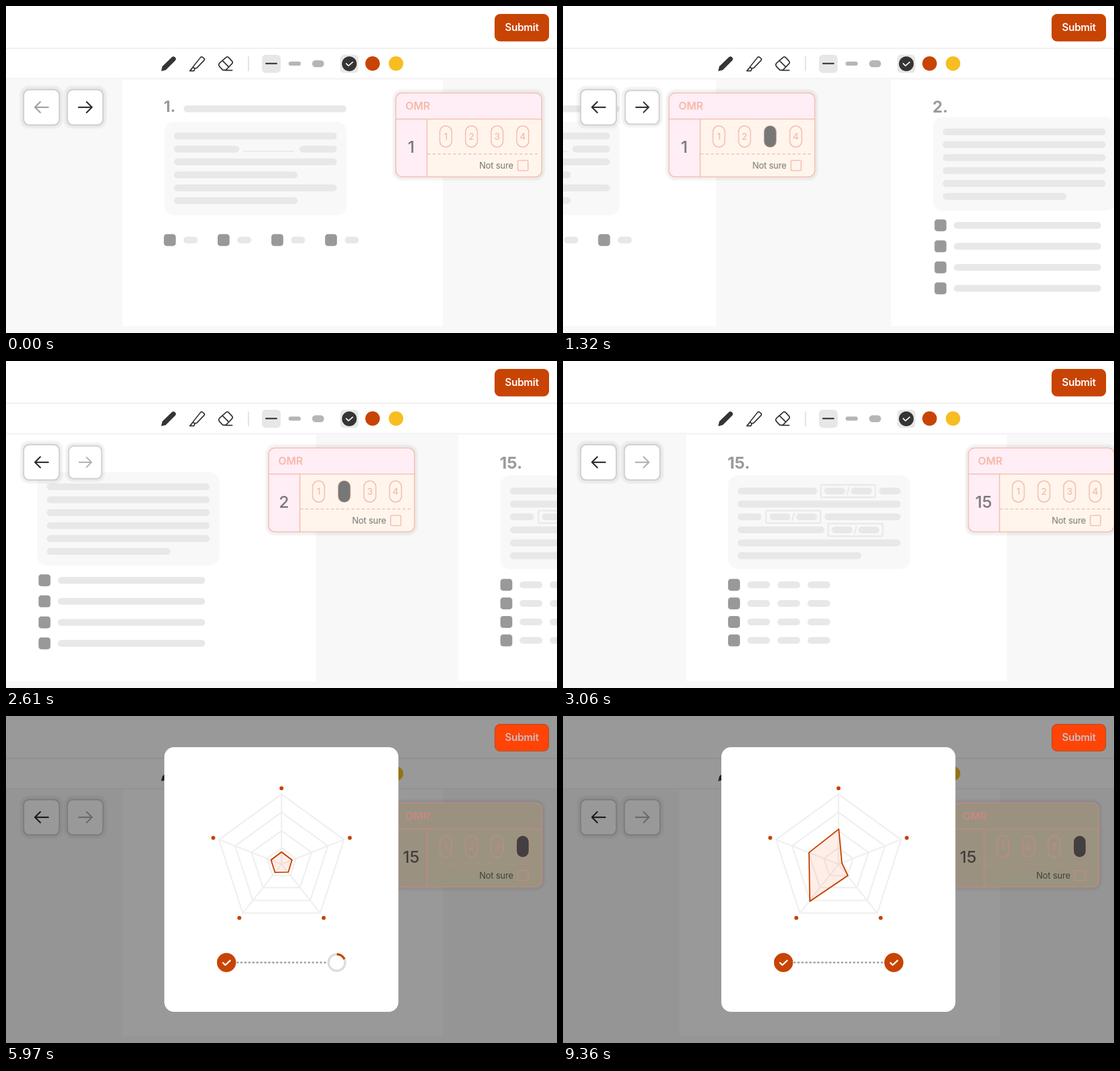
Write an HTML page that moves like this. It is 971 by 577 pixels and loops after 9390 ms.

```html
<!DOCTYPE html>
<html lang="en">
<head>
<meta charset="utf-8">
<title>Answer sheet</title>
<style>
html, body { margin: 0; width: 100%; height: 100%; overflow: hidden; background: #fff; }
svg { display: block; width: 971px; height: 577px; font-family: Inter, "Open Sans", sans-serif; }

.bar { fill: #e8e8e8; }
.box { fill: #f8f8f8; }
.key { fill: #999; }
.slot { fill: none; stroke: #e8e8e8; stroke-width: 2.5; }
.num { font-size: 28px; font-weight: 700; fill: #999; }
.halo { fill: #000; opacity: .055; filter: blur(1.5px); }
.icon { fill: none; stroke: #373435; stroke-width: 2; stroke-linejoin: round; stroke-linecap: round; }
.check { fill: none; stroke: #fff; stroke-width: 2.6; stroke-linecap: round; stroke-linejoin: round; }

.pink { fill: #ffeef5; }
.cream { fill: #fff5ec; }
.line { fill: none; stroke: #f5b9a9; stroke-width: 1.6; }
.tint { fill: #f5b9a9; font-weight: 600; }
.ink { fill: #777; }

.web { fill: none; stroke: #efefef; stroke-width: 2.5; }
.arc { fill: none; stroke: #c84404; stroke-width: 4; stroke-dasharray: 100 200; }

/* one shared loop */
.a { animation: 9.39s cubic-bezier(.65, 0, .35, 1) infinite; }
.step { animation-timing-function: step-end; }

#p1, #o1 { animation-name: out1; }
#p2 { --from: 770px; animation-name: pass2; }
#o2 { --from: 1770px; animation-name: pass2; }
#p3 { --from: 770px; animation-name: in3; }
#o3 { --from: 1770px; animation-name: in3; }
@keyframes out1 { 0%, 9.052% { transform: none; } 18.978%, 100% { transform: translateX(-971px); } }
@keyframes pass2 {
  0%, 9.052% { transform: translateX(var(--from)); }
  18.978%, 23.951% { transform: translateX(0); }
  33.876%, 100% { transform: translateX(-971px); }
}
@keyframes in3 { 0%, 23.951% { transform: translateX(var(--from)); } 33.876%, 100% { transform: translateX(0); } }

#m1 { animation-name: mark1; }
#m2 { animation-name: mark2; }
#m3 { animation-name: mark3; }
@keyframes mark1 { 0% { opacity: 0; } 3.195%, 100% { opacity: 1; } }
@keyframes mark2 { 0% { opacity: 0; } 20.234%, 100% { opacity: 1; } }
@keyframes mark3 { 0% { opacity: 0; } 36.209%, 100% { opacity: 1; } }

#next { transform-origin: 139.5px 178.5px; animation-name: press; }
@keyframes press {
  0%, 5.431%, 18.978%, 20.9%, 33.876%, 100% { transform: scale(1); }
  8.6%, 9.052%, 23.6%, 23.951% { transform: scale(.9); }
}
#backArrow { animation-name: wake; }
#nextArrow { animation-name: rest; }
@keyframes wake { 0%, 5.431% { stroke: #a0a0a0; } 9.052%, 100% { stroke: #2e2b2b; } }
@keyframes rest { 0%, 20.9% { stroke: #2e2b2b; } 23.951%, 100% { stroke: #b0b0b0; } }

#submit { transform-origin: 909px 38px; animation-name: send; }
#submit rect { animation-name: glow; }
#submit text { animation-name: glowText; }
@keyframes send { 0%, 41.534%, 46.326%, 100% { transform: scale(1); } 44.196% { transform: scale(.95); } }
@keyframes glow {
  0%, 48.562% { fill: #c84404; stroke: #c84404; }
  51.438%, 100% { fill: #ff4405; stroke: #a34a2c; }
}
@keyframes glowText { 0%, 46.326% { fill: #fff; } 48.562% { fill: #ebe2e0; } 51.438%, 100% { fill: #c9bfc4; } }

#dim { animation-name: dim; }
@keyframes dim { 0%, 46.326% { opacity: 0; } 51.438%, 100% { opacity: .4; } }

#o3 .pink { animation-name: dimPink; }
#o3 .cream { animation-name: dimCream; }
#o3 .line { animation-name: dimLine; }
#o3 .tint { animation-name: dimTint; }
#o3 .ink { animation-name: dimInk; }
@keyframes dimPink { 0%, 46.326% { fill: #ffeef5; } 48.562% { fill: #d2d2d2; } 51.438%, 100% { fill: #9a9180; } }
@keyframes dimCream { 0%, 46.326% { fill: #fff5ec; } 48.562% { fill: #dedede; } 51.438%, 100% { fill: #9a9380; } }
@keyframes dimLine { 0%, 46.326% { stroke: #f5b9a9; } 48.562% { stroke: #e09a86; } 51.438%, 100% { stroke: #c48a80; } }
@keyframes dimTint { 0%, 46.326% { fill: #f5b9a9; } 48.562% { fill: #dc9f90; } 51.438%, 100% { fill: #c48a80; } }
@keyframes dimInk { 0%, 46.326% { fill: #777; } 48.562% { fill: #3a3637; } 51.438%, 100% { fill: #433f40; } }

#modal { transform-origin: 485.5px 288.5px; animation-name: open; }
@keyframes open { 0%, 46.326% { opacity: 0; transform: scale(.7); } 51.438%, 100% { opacity: 1; transform: scale(1); } }

#arc1 { animation-name: load1; }
#arc2 { animation-name: load2; }
#done1 { animation-name: done1; }
#done2 { animation-name: done2; }
@keyframes load1 { 0%, 51.438% { stroke-dashoffset: 96; } 59.106%, 100% { stroke-dashoffset: 0; } }
@keyframes load2 { 0%, 60.788% { stroke-dashoffset: 101; } 68.456%, 100% { stroke-dashoffset: 0; } }
@keyframes done1 { 0%, 59.106% { opacity: 0; } 60.7%, 100% { opacity: 1; } }
@keyframes done2 { 0%, 68.456% { opacity: 0; } 70%, 100% { opacity: 1; } }

#score { fill: #f4622b; fill-opacity: .11; stroke: #c84404; stroke-width: 2.2; stroke-linejoin: round; animation-name: grow; }
@keyframes grow {
  0%, 69% { d: path("M485.5 240L504 254L497.5 275.5L474 276L467 254Z"); }
  76.5%, 100% { d: path("M486 199.5L491.5 259.5L502 281.5L435 327L433.5 241Z"); }
}
</style>
</head>
<body>
<svg id="stage" viewBox="0 0 971 577"></svg>
<script>
const rect = (cls, x, y, x2, y2, r = 0, more = '') =>
  `<rect class="${cls}" x="${x}" y="${y}" width="${x2 - x}" height="${y2 - y}" rx="${r}" ${more}/>`;
const bar = (x, x2, y) => rect('bar', x, y - 6, x2, y + 6, 6);
const key = (x, y) => rect('key', x, y - 10.5, x + 21, y + 10.5, 5);
const text = (cls, x, y, s, more = '') => `<text class="${cls}" x="${x}" y="${y}" ${more}>${s}</text>`;
const each = (list, fn) => list.map(fn).join('');
const circle = (x, y, r, more) => `<circle cx="${x}" cy="${y}" r="${r}" ${more}/>`;
const mid = 'text-anchor="middle"';

const page = (id, body) => `<g id="${id}" class="a">${rect('', 205, 130, 770, 565, 0, 'fill="#fff"')}${body}</g>`;

// a framed pair of short words with a slash
const pair = (x, y) => rect('slot', x, y - 11, x + 96, y + 11, 2) + bar(x + 6, x + 43, y) +
  bar(x + 53, x + 90, y) + `<path class="slot" d="M${x + 46} ${y + 7}l4-14"/>`;

const page1 = page('p1',
  text('num', 278, 187, '1.', 'style="font-size:27px"') + bar(313, 600, 181.5) +
  rect('box', 279, 204.5, 600, 369, 17) +
  each([229.5, 275, 321], y => bar(296, 583, y)) +
  bar(296, 411, 252.5) + bar(517, 583, 252.5) + rect('bar', 418, 255.5, 508, 257.5) +
  each([298, 343.5], y => bar(296, 514, y)) +
  each([0, 1, 2, 3], i => key(278.2 + i * 94.7, 413) + bar(312.7 + i * 94.7, 337.7 + i * 94.7, 413)));

const page2 = page('p2',
  text('num', 278, 188, '2.') + rect('box', 279, 196, 600, 361, 17) +
  each([0, 1, 2, 3, 4, 5], i => bar(296, i < 5 ? 583 : 514, 222 + i * 22.8)) +
  each([0, 1, 2, 3], i => key(281.5, 387 + i * 37.1) + bar(315.5, 575, 387 + i * 37.1)));

const page3 = page('p3',
  text('num', 278, 189.5, '15.', 'style="font-size:29px"') + rect('box', 279, 202, 600, 367, 17) +
  bar(296, 436, 229.5) + pair(442.5, 229.5) + bar(545, 583, 229.5) + bar(296, 583, 252.5) +
  bar(296, 338, 275) + pair(346, 275) + bar(449, 583, 275) +
  bar(296, 449, 298) + pair(455.5, 298) + bar(296, 583, 321) + bar(296, 514, 343.5) +
  each([0, 1, 2, 3], i => {
    const y = 395 + i * 32.7;
    return key(279, y) + each([313, 366, 419], x => bar(x, x + 40, y));
  }));

const sheet = (n, label, pick) => {
  const pill = (i, cls, more) => rect(cls, 764.5 + i * 45.2, 211.5, 785.5 + i * 45.2, 249, 10.5, more);
  return `<g id="o${n}" class="a">` + rect('halo', 681.5, 147.5, 949.5, 307.5, 16) +
    rect('a cream', 687, 153.5, 944, 301.5, 11) +
    '<path class="a pink" d="M687 301.5V153.5H944V199.5H742V301.5Z" clip-path="url(#card)"/>' +
    rect('a line', 687, 153.5, 944, 301.5, 11) +
    '<path class="a line" d="M687 199.5H944M742 199.5V301.5"/>' +
    '<path class="a line" d="M743 261.2H940" stroke-dasharray="5 4"/>' +
    text('a tint', 704, 183, 'OMR', 'font-size="18.5"') +
    text('a ink', 714, 258.5, label, mid + ' font-size="29" font-weight="500"') +
    each([0, 1, 2, 3], i => pill(i, 'a line', '') +
      text('a tint', 775 + i * 45.2, 236, i + 1, mid + ' font-size="16" style="font-weight:500"')) +
    `<g id="m${n}" class="a step">${pill(pick - 1, 'a ink', '')}</g>` +
    text('a ink', 894, 286.5, 'Not sure', 'text-anchor="end" font-size="15.3" letter-spacing="-.2"') +
    rect('a line', 902, 272.5, 920, 290.5, 2) + '</g>';
};

const nav = (id, x, tip) => `<g id="${id}" class="a">` +
  rect('halo', x - 6, 141, x + 69, 216, 15) +
  rect('', x, 147.5, x + 63, 210, 10, 'fill="#fff" stroke="#d0d0d0" stroke-width="2.4"') +
  `<path id="${id}Arrow" class="a icon" style="stroke-width:2.4" d="M${x + 20} 178.7h23.5${tip}"/></g>`;

const toolbar =
  '<path d="M273.5 115l2-8.5 16.5-16q3-3 6 0t0 6l-16.5 16.5z" fill="#373435"/>' +
  '<path class="icon" d="M331 105.5L343 90.5q1.5-1.5 3.5 0l2.5 2q1.5 1.5 0 3.5L336 109.5l-4 .5-2.5-2.5zM329.5 108l-5.5 6.5h7l2-4"/>' +
  '<path class="icon" d="M376 101L388 90.5q2-1.5 4 0l6.5 7q1.5 2 0 4L387.500 113h-5.500l-6-6.500q-2-2.500 0-5.500zM381.500 96.500l11 11M386 113.500h12.500"/>' +
  rect('', 426.3, 89, 428.3, 115, 0, 'fill="#dfdfdf"') +
  rect('', 451, 86, 484, 118, 7, 'fill="#e7e7e7"') + rect('', 457, 100.3, 478, 102.8, 1, 'fill="#373435"') +
  rect('', 498, 98, 519.5, 105.3, 3.6, 'fill="#b6b6b6"') + rect('', 539.5, 95.7, 560.5, 108, 6, 'fill="#b6b6b6"') +
  rect('', 589, 86, 621, 118, 7, 'fill="#e7e7e7"') + circle(605, 102, 13, 'fill="#373435"') +
  '<path class="check" style="stroke-width:1.8" d="M599.500 101.500l4 4 7.500-6.500"/>' +
  circle(646, 101.5, 12.8, 'fill="#c84404"') + circle(687.3, 101.5, 12.8, 'fill="#f8bd20"');

const corner = (r, cy, i) => {
  const a = i * Math.PI * 2 / 5;
  return [485.5 + r * Math.sin(a), cy - r * Math.cos(a)];
};
const five = [0, 1, 2, 3, 4];
// rings drift upward as they widen
const ringY = r => 261.5 - r * .065;
const radar =
  each([27, 55.5, 86, 116], r => `<polygon class="web" points="${five.map(i => corner(r, ringY(r), i)).join(' ')}"/>`) +
  each(five, i => `<path class="web" d="M485.5 261.500L${corner(116, 254, i)}"/>`) +
  each(five, i => circle(...corner(126.5, 254, i), 3.5, 'fill="#c84404"')) +
  '<path id="score" class="a"/>';

const loader = (n, x) =>
  circle(x, 435, 14.6, 'fill="#fff" stroke="#dcdcdc" stroke-width="4"') +
  circle(x, 435, 14.6, `id="arc${n}" class="a arc" pathLength="100" transform="rotate(-90 ${x} 435)"`) +
  `<g id="done${n}" class="a">${circle(x, 435, 16.7, 'fill="#c84404"')}<path class="check" d="M${x - 6} 435.5l4 4 8.500-8"/></g>`;

document.getElementById('stage').innerHTML =
  '<clipPath id="card"><rect x="687" y="153.5" width="257" height="148" rx="11"/></clipPath>' +
  rect('', 0, 0, 971, 577, 0, 'fill="#fff"') + rect('', 0, 128, 971, 577, 0, 'fill="#f8f8f8"') +
  rect('', 0, 73.5, 971, 76, 0, 'fill="#f0f0f0"') + rect('', 0, 127, 971, 129, 0, 'fill="#f3f3f3"') +
  toolbar + page1 + page2 + page3 + sheet(1, '1', 3) + sheet(2, '2', 2) +
  nav('back', 31, 'm-23.5 0l9.5-9.500m-9.500 9.500l9.500 9.500') + nav('next', 108, 'l-9.500-9.500m9.500 9.500l-9.500 9.500') +
  rect('a', 0, 0, 971, 577, 0, 'id="dim"') +
  sheet(3, '15', 4) +
  '<g id="submit" class="a">' + rect('a', 861.5, 14.5, 956.5, 62, 9) +
  text('a', 909, 44, 'Submit', mid + ' font-size="18" font-weight="600" letter-spacing="-.3"') + '</g>' +
  '<g id="modal" class="a">' + rect('', 279, 55, 691.5, 522, 17, 'fill="#fff"') + radar +
  '<path d="M406 435H567" stroke="#a8a8a8" stroke-width="3" stroke-dasharray="4 3"/>' +
  loader(1, 388.5) + loader(2, 583) + '</g>';
</script>
</body>
</html>
```
